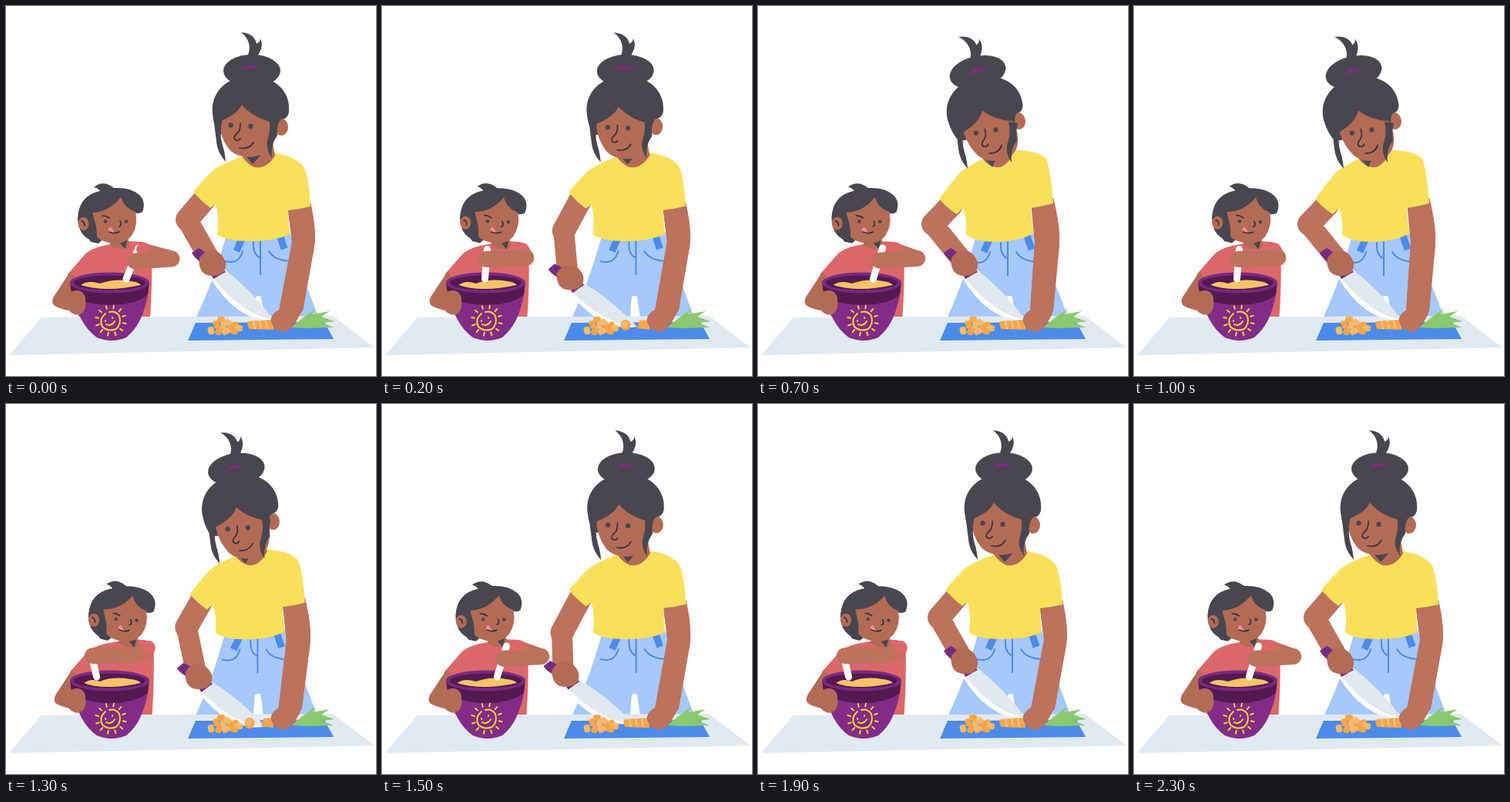
An HTML page that plays this animation: 480 px wide and 480 px high, repeating every 2.4 s.

```html
<!DOCTYPE html>
<html lang="en">
<head>
<meta charset="utf-8">
<title>Cooking together</title>
<style>
  html, body { margin: 0; width: 100%; height: 100%; overflow: hidden; background: #fff; }
  svg { display: block; width: 100vw; height: 100vh; }
  .hair { fill: #49464f; }
  .skin { fill: #b36b56; }
  .arm { fill: #bc725d; }
  .red { fill: #dd6768; }
  .line { fill: none; stroke: #35313a; stroke-width: 1.7; stroke-linecap: round; stroke-linejoin: round; }
  .stitch { fill: none; stroke: #4c8be8; stroke-width: 2; stroke-linecap: round; }
  .limb { fill: none; stroke: #bc725d; stroke-linecap: round; stroke-linejoin: round; }
  .sun { fill: none; stroke: #f8da35; stroke-width: 1.9; stroke-linecap: round; }
</style>
</head>
<body>
<svg viewBox="0 0 480 480">
  <!-- child: body and head -->
  <g id="kidBody">
    <path class="red" d="M126 311Q108 315 101 324L80 348L94 360V403H187Q190 360 189 320Q188 307 176 306L158 305Z"/>
    <path class="skin" d="M83 345L62 377Q57 386 65 390Q75 395 90 396L96 374L88 371L95 357Z"/>
  </g>
  <g id="kidHead">
    <path class="skin" d="M134 298H158L160 312Q150 318 135 311Z"/>
    <path class="hair" d="M147 307L157 304L155 315Z"/>
    <path class="hair" d="M120 308L110 306L108 303Q99 298 96 290Q90 276 96 260Q103 244 122 240Q119 236 114 235Q126 225 140 236Q162 235 173 245Q182 254 177 267Q171 271 164 267L140 290Z"/>
    <path class="skin" d="M112 268Q134 267 149 248Q153 262 168 267Q172 284 163 298Q154 309 139 308Q124 306 118 300L117 286Z"/>
    <ellipse class="skin" cx="100.500" cy="282.500" rx="7" ry="8.500"/>
    <path class="line" d="M98 279Q102 280 102 285"/>
    <circle class="hair" cx="129" cy="279.500" r="2.300"/>
    <circle class="hair" cx="156" cy="279.500" r="2.300"/>
    <path class="line" d="M125 272Q130 272 134 275M148 279Q151 284 147 286M134 293Q141 296 147 293"/>
    <path d="M133 292Q132 287 136 287Q139 289 140 294Z" fill="#f08b93"/>
  </g>

  <!-- adult: lower body and torso -->
  <path id="jeans" fill="#a6c8fa"/>
  <g id="details" class="stitch">
    <path d="M330 305V348M321 306Q320 322 329 326M284 331Q302 336 307 318M341 318Q348 330 368 331"/>
    <path stroke-width="9" stroke-linecap="butt" d="M306 302L299 318M355 297L361 315"/>
  </g>
  <path id="rightArm" class="arm"/>

  <path d="M46 404L424 402L478 443L4 453Z" fill="#e1e9f1"/>
  <path d="M246 411L413 410L425 432L236 434Z" fill="#4c8be8"/>
  <path d="M370 417L386 404L402 392L397 400L420 396L409 403L426 409L410 411L425 417L390 418Z" fill="#8bc96e"/>

  <!-- bowl -->
  <path d="M85 368Q94 414 118 430Q137 438 156 430Q179 412 185 368Z" fill="#822c87"/>
  <path d="M83 358L85 374Q98 387 135 388Q172 387 184 374L186 358Z" fill="#541950"/>
  <ellipse cx="134.500" cy="359" rx="51.500" ry="13.500" fill="#782a80"/>
  <ellipse cx="134.500" cy="359" rx="46.500" ry="9.500" fill="#541950"/>
  <path id="batter" fill="#f4c467"/>
  <path id="spoon" fill="none" stroke="#fff" stroke-width="9" stroke-linecap="round"/>
  <g id="sun" class="sun">
    <path d="M129 399Q120 407 125 416Q132 423 143 419Q150 412 147 402Q142 395 134 397M129 408v1M138 404v1M130 413Q137 416 141 409"/>
  </g>
  <path class="skin" d="M80 374Q88 367 97 370Q104 374 103 382Q105 391 100 397Q94 404 85 398Q77 392 77 383Z"/>

  <!-- child: stirring arm -->
  <path id="kidUpper" class="limb" stroke-width="19"/>
  <circle id="kidSleeve" class="red" cy="316" r="9"/>
  <path id="kidFore" class="limb" stroke-width="21"/>

  <use href="#rightArm"/>

  <!-- adult: chopping arm and knife -->
  <path id="upperArm" class="limb" stroke-width="30"/>
  <path id="foreArm" class="limb" stroke-width="27"/>
  <g id="knife">
    <path d="M-2 20L18 10Q51 36 80 74Q34 78 -2 20Z" fill="#fff"/>
    <path d="M1 19L18 10Q51 36 80 74Q40 68 1 19Z" fill="#e1e8ef"/>
    <path d="M-26 -13L-17 -19Q-9 -15 -6 -10L-13 0Q-22 -5 -26 -13ZM0 17L14 9L18 12L2 21Z" fill="#732b80"/>
    <path class="skin" d="M-16 -6Q-9 -17 3 -16Q14 -13 18 0Q19 13 9 16Q-3 19 -10 14Q-18 8 -16 -6Z"/>
  </g>
  <g id="dice"></g>
  <g id="carrot">
    <path d="M314 409L347 407V420L316 419Q312 414 314 409Z" fill="#f9a64b"/>
    <path d="M321 409l2 10M329 408l2 11M337 408l2 11" stroke="#fdc684" stroke-width="2"/>
  </g>
  <g id="slices">
    <ellipse cx="316" cy="414" rx="6.500" ry="7" fill="#f9a64b"/>
    <ellipse cx="315" cy="413.500" rx="4" ry="5" fill="#fbb866"/>
    <path d="M334 408L347 407V420L331 418Z" fill="#f9a64b"/>
  </g>
  <path class="arm" d="M354 394Q342 401 344 410Q348 421 359 423Q370 421 376 410L382 399Z"/>

  <path id="shirt" fill="#f9e05a"/>
  <path id="neck" class="skin"/>
  <path id="shade" class="hair"/>

  <!-- adult: head -->
  <g id="head">
    <path class="hair" d="M305 34C318 35 324 42 325 49Q330 47 330 42C335 54 328 60 326 67L313 66C319 53 315 42 305 34Z"/>
    <ellipse class="hair" cx="319" cy="84" rx="37" ry="21"/>
    <path id="tie" d="M305 84Q317 70 330 83Q317 79 305 84Z" fill="#7d2b83"/>
    <ellipse class="skin" cx="357" cy="157" rx="9" ry="11"/>
    <path class="hair" d="M268 140C265 112 286 91 318 91C350 91 370 112 367 138Q365 147 357 147Q351 152 351 170L276 166Q269 154 268 140Z"/>
    <g id="face">
      <path class="skin" d="M306 128Q299 142 276 150Q278 170 288 184Q297 196 318 196Q343 194 344 166L342 150Q318 143 306 128Z"/>
      <circle class="hair" cx="291.500" cy="154.500" r="3.200"/>
      <circle class="hair" cx="317.500" cy="156" r="3.200"/>
      <path class="line" d="M304 152Q304 161 301 164Q294 170 297 173Q301 176 304 172M303 184Q315 187 321 177"/>
    </g>
  </g>
  <path id="leftLock" class="hair" d="M269 144L281 146Q276 165 281 181Q284 190 285 202Q274 190 273 176Z"/>
  <path id="rightLock" class="hair" d="M341 144L353 146Q350 158 352 168C345 178 344 187 345 197C337 186 338 176 341 168Q344 156 341 144Z"/>
</svg>
<script>
const LOOP = 2400, HOLD = 100;
const $ = id => document.getElementById(id);
const set = (id, name, value) => $(id).setAttribute(name, value);
const shape = (id, d) => set(id, 'd', d);
const move = (id, value) => set(id, 'transform', value);
const clamp = v => Math.max(0, Math.min(1, v));
const ease = p => (1 - Math.cos(Math.PI * clamp(p))) / 2;
const lerp = (a, b, p) => a + (b - a) * p;

// Blend two paths that share the same commands.
function mix([a, b], p) {
  const ends = b.match(/-?\d+/g);
  let i = 0;
  return a.replace(/-?\d+/g, n => lerp(+n, +ends[i++], p).toFixed(2));
}

// Upright and leaning outlines
const poses = {
  jeans: [
    'M285 300L368 293Q379 335 405 403L335 403L331 377Q327 374 324 378L322 403L247 403Q268 360 285 300Z',
    'M282 301L358 291Q376 335 402 403L333 403L330 377Q326 374 322 378L320 403L246 403Q266 360 282 301Z'],
  rightArm: [
    'M365 258L371 306L354 396L382 399L385 395L400 312Q403 290 395 255Z',
    'M354 254L359 306L353 396L381 399L383 395L391 308Q392 285 383 249Z'],
  shirt: [
    'M304 196Q285 203 270 212Q258 223 243 241Q252 252 265 262L272 257Q277 275 274 296Q285 305 315 305Q350 305 368 296Q366 280 366 265Q380 264 395 260Q393 225 387 210Q378 196 350 191Z',
    'M292 198Q277 205 263 215Q251 229 235 250Q246 263 258 270L266 262Q272 280 270 297Q283 306 310 306Q345 304 358 294Q354 275 354 262Q369 260 383 256Q380 215 374 198Q362 187 332 187Z'],
  neck: [
    'M306 192L345 172L349 194Q338 212 322 209Q313 205 306 195Z',
    'M293 196L325 170L332 189Q322 212 308 209Q298 207 292 199Z'],
  shade: [
    'M309 192L330 194L320 205Z',
    'M294 198L308 199L304 209Z']
};

// Chop cycle: time, hand x, hand y, knife angle, elbow x, elbow y
const chop = [
  [0, 267, 333, 0, 235, 277],
  [100, 249, 353, -6, 239, 286],
  [300, 237, 350, -7, 234, 296],
  [500, 248, 353, -6, 239, 287],
  [700, 267, 333, 0, 235, 277],
  [1200, 267, 333, 0, 235, 277]
];
function chopAt(t) {
  const i = chop.findIndex(k => k[0] > t);
  const a = chop[i - 1], b = chop[i];
  const p = (t - a[0]) / (b[0] - a[0]);
  return a.slice(1).map((v, j) => lerp(v, b[j + 1], p));
}

function drawAdult(t) {
  const lean = clamp(ease((t - 100) / 500) - ease((t - 1080) / 500));
  const turn = lean ** 0.4; // the face turns ahead of the body
  for (const id in poses) shape(id, mix(poses[id], lean));
  move('details', `translate(${-6 * lean} ${lean})`);
  move('head', `translate(${-22.5 * lean} ${lean}) rotate(${-12.5 * lean} 317.5 137)`);
  move('face', `translate(${8.2 * turn} ${6 * turn})`);
  move('tie', `translate(0 ${2 * lean})`);
  move('leftLock', `translate(${-13 * lean} ${9 * lean})`);
  move('rightLock', `translate(${-16 * lean} ${6 * lean})`);

  const [hx, hy, angle, bx, by] = chopAt(t % 1200);
  const ex = bx - 8 * lean, ey = by + 6 * lean;
  shape('upperArm', `M${259 - 8 * lean} ${249 + 9 * lean}L${ex} ${ey}`);
  shape('foreArm', `M${ex} ${ey}L${hx - 2} ${hy - 3}`);
  move('knife', `translate(${hx} ${hy}) rotate(${angle})`);
  const cut = hy > 351;
  set('slices', 'visibility', cut ? 'visible' : 'hidden');
  set('carrot', 'visibility', cut ? 'hidden' : 'visible');
}

function drawChild(t) {
  const s = (1 - Math.cos(t / 800 * 2 * Math.PI)) / 2;
  move('kidBody', `translate(${3 * s} 0)`);
  move('kidHead', `translate(${14.5 * s} 0) rotate(${4 * s} 137 300)`);
  const hand = 167 - 64 * s, elbow = 215 - 56 * s;
  shape('spoon', `M${172 - 71 * s} ${314 + 25 * s ** 4}L${156 - 45 * s} 354`);
  shape('kidUpper', `M${181 + 3 * s} 318L${elbow} 327`);
  set('kidSleeve', 'cx', 178 + 8 * s);
  shape('kidFore', `M${hand} ${331 - 5 * s}L${elbow} ${328 - 3 * s}`);
  const left = 97 + 5 * s;
  shape('batter', `M${left} 362Q${left + 9} 355 122 360Q${144 - 8 * s} 353 162 357Q172 358 175 362Q152 367 134 367Q112 367 ${left} 362Z`);
}

function addParts() {
  const at = [[279, 407], [288, 411], [273, 413], [282, 414], [297, 414], [302, 418], [291, 419], [266, 421], [276, 422], [285, 422], [296, 422]];
  $('dice').innerHTML = at.map(([x, y], i) =>
    `<rect x="${x - 5}" y="${y - 4}" width="10" height="8" rx="3" fill="${i % 2 ? '#fcb968' : '#f9a64b'}" transform="rotate(${i * 37} ${x} ${y})"/>`).join('');
  let rays = '';
  for (let i = 0; i < 12; i++) {
    const a = i * Math.PI / 6 + 0.2, c = Math.cos(a), n = Math.sin(a);
    rays += `M${136 + 16 * c} ${408 + 16 * n}L${136 + 20 * c} ${408 + 20 * n}`;
  }
  $('sun').insertAdjacentHTML('beforeend', `<path d="${rays}"/>`);
}

addParts();
const start = performance.now();
function frame() {
  const t = Math.floor((performance.now() - start) % LOOP / HOLD) * HOLD;
  drawAdult(t);
  drawChild(t);
  requestAnimationFrame(frame);
}
frame();
</script>
</body>
</html>
```
